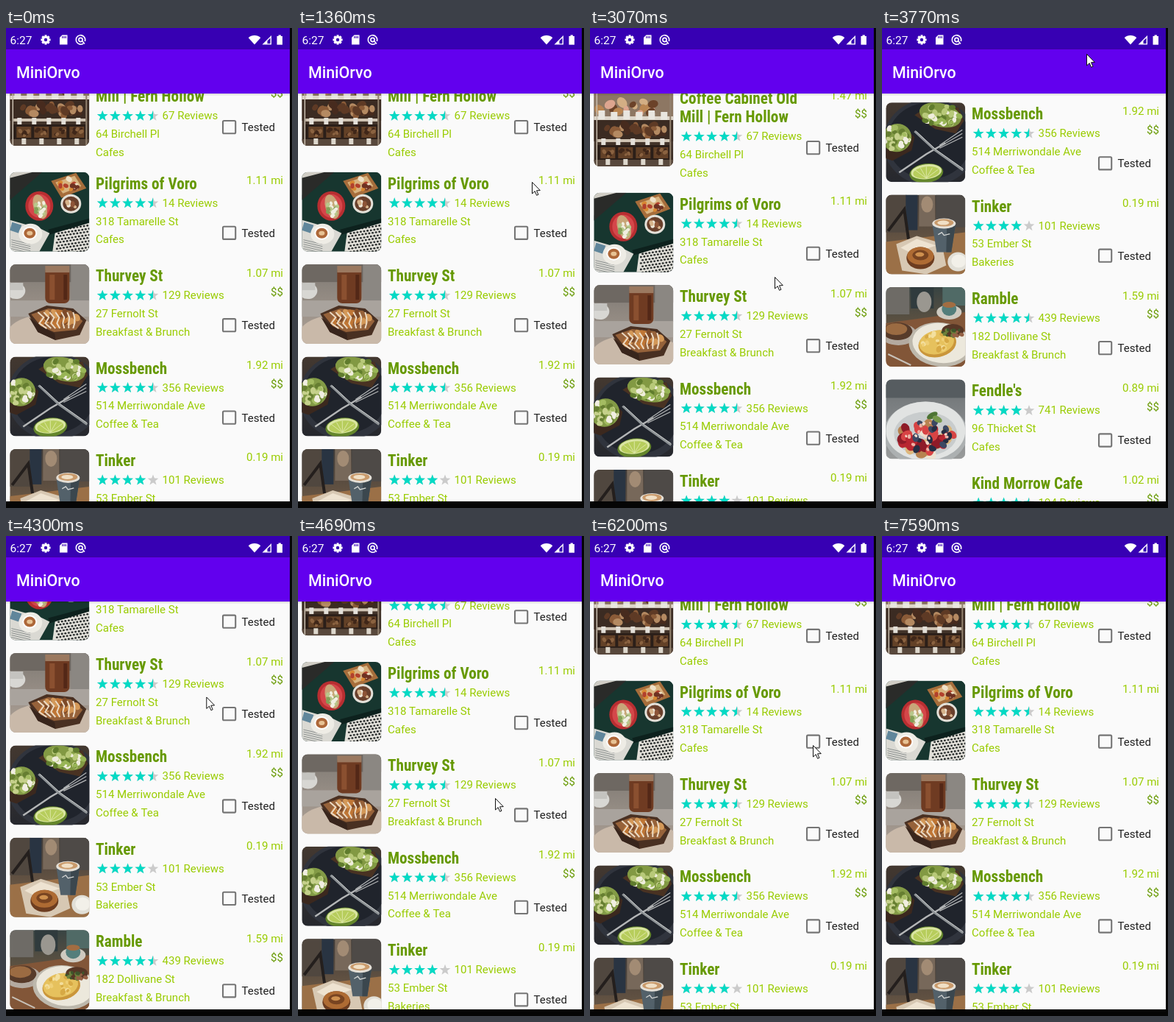
Recreate the animation shown at these times as an HTML page with a canvas. Size 389 by 652 pixels, loop 9330 ms.

```html
<!DOCTYPE html>
<html lang="en">
<head>
<meta charset="utf-8">
<title>MiniOrvo</title>
<style>
html, body { margin: 0; width: 100%; height: 100%; overflow: hidden; background: #050505; }
canvas { display: block; width: 389px; height: 652px; }
</style>
</head>
<body>
<canvas id="stage"></canvas>
<script>
const W = 389, H = 652, LOOP = 9330;
const canvas = document.getElementById('stage');
const c = canvas.getContext('2d');
const dpr = window.devicePixelRatio || 1;
canvas.width = Math.round(W * dpr);
canvas.height = Math.round(H * dpr);

const BODY = '400 15.05px Roboto, sans-serif';
const BAR = '500 21.4px Roboto, sans-serif';
const TITLE = '700 condensed 21.2px "Roboto Condensed", Roboto, sans-serif';
const DARK = '#669900', LIGHT = '#99cc00', TEAL = '#03dac5', BG = '#fafafa';

// Narrow the titles evenly when no condensed face is installed.
function width(font) {
  c.font = font;
  return c.measureText('Hamburgefonts').width;
}
const squeeze = width(TITLE) > width('700 21.2px Roboto, sans-serif') * 0.96 ? 0.88 : 1;

// ---- drawing helpers ----
function text(s, x, y, font, color, align = 'left') {
  c.font = font;
  c.fillStyle = color;
  c.textAlign = align;
  c.fillText(s, x, y);
}
function title(s, x, y) {
  c.save();
  c.translate(x, y);
  c.scale(squeeze, 1);
  text(s, 0, 0, TITLE, DARK);
  c.restore();
}
function rect(x, y, w, h, color) {
  c.fillStyle = color;
  c.fillRect(x, y, w, h);
}
function oval(x, y, rx, ry, color, rot = 0) {
  c.fillStyle = color;
  c.beginPath();
  c.ellipse(x, y, rx, ry, rot, 0, 7);
  c.fill();
}
function trace(pts) {
  c.beginPath();
  for (let i = 0; i < pts.length; i += 2) c.lineTo(pts[i], pts[i + 1]);
}
function poly(color, ...pts) {
  trace(pts);
  c.closePath();
  c.fillStyle = color;
  c.fill();
}
function line(color, w, ...pts) {
  trace(pts);
  c.strokeStyle = color;
  c.lineWidth = w;
  c.stroke();
}
function fade(top, bottom) {
  const g = c.createLinearGradient(0, 0, 0, 108);
  g.addColorStop(0, top);
  g.addColorStop(1, bottom);
  rect(0, 0, 108, 108, g);
}
function random(seed) {
  return () => (seed = (seed * 16807) % 2147483647) / 2147483647;
}
function scatter(seed, n, x, y, rx, ry, size, colors) {
  const r = random(seed);
  for (let i = 0; i < n; i++) {
    const a = r() * 6.28, d = Math.sqrt(r()), s = size * (0.6 + r() * 0.6);
    oval(x + Math.cos(a) * d * rx, y + Math.sin(a) * d * ry, s, s * 0.75,
      colors[i % colors.length], r() * 3);
  }
}

// ---- food pictures, each 108 by 108 ----
function pastryCase() {
  fade('#6a5546', '#33271f');
  rect(0, 8, 108, 34, '#8d7763');
  scatter(9, 16, 54, 29, 50, 9, 7, ['#b98552', '#d3ae84', '#dda58f', '#6b4229']);
  rect(0, 40, 108, 5, '#ddd5c9');
  for (let i = 0; i < 6; i++) rect(6 + i * 17, 32 + i % 2 * 2, 9, 12, '#e9e6df');
  rect(0, 45, 108, 29, '#3b2b22');
  scatter(41, 26, 54, 60, 49, 8, 6.5, ['#8a5b38', '#5e3a25', '#b48a62', '#472b1e']);
  rect(5, 71, 98, 4, '#cfc3b3');
  for (let i = 0; i < 5; i++) rect(10 + i * 20, 70, 6, 9, '#e3dfd8');
  rect(4, 79, 100, 22, '#2b1f19');
  for (let i = 0; i < 4; i++) {
    rect(9 + i * 24, 82, 20, 15, '#634127');
    scatter(i + 70, 8, 19 + i * 24, 89, 8, 5, 3, ['#8a6240', '#402719']);
  }
  rect(0, 99, 108, 9, '#58483c');
  for (let i = 0; i < 4; i++) rect(16 + i * 24, 98, 6, 8, '#ddd7cc');
  line('#cabfb1', 1.5, 4, 0, 4, 108);
  line('#93826f', 2, 104, 0, 104, 108);
}
function cafeTable() {
  rect(0, 0, 108, 108, '#17362f');
  poly('#d0cdc5', 0, 0, 38, 0, 0, 31);
  poly('#2a2b29', 0, 8, 31, 0, 44, 0, 0, 38);
  poly('#e1dfd8', 62, 78, 108, 66, 108, 108, 58, 108);
  for (let y = 0; y < 9; y++)
    for (let x = 0; x < 11; x++)
      oval(64 + x * 4.6 + y % 2 * 2.3, 79 + y * 4.2 - x * 0.7, 1.5, 1.3, '#272b2b');
  poly('#0d211d', 52, 78, 108, 63, 108, 69, 54, 85);
  poly('#a66d3b', 56, 12, 90, 1, 104, 22, 70, 35);
  poly('#d7b37f', 62, 14, 88, 5, 97, 19, 72, 29);
  scatter(17, 12, 80, 17, 13, 8, 4, ['#b2412c', '#efe1c7', '#d88833', '#6e3222']);
  oval(40, 46, 19, 20, '#b82e31');
  oval(40, 46, 15, 16, '#d4474a');
  oval(41, 47, 9, 17, '#c8a678', -0.3);
  scatter(5, 17, 41, 46, 8, 14, 3.5, ['#b8c78b', '#f1eee0', '#839f57']);
  oval(83, 43, 14, 13, '#e4e1d9');
  oval(83, 43, 11, 10, '#69402c');
  scatter(23, 10, 83, 43, 8, 7, 3.5, ['#d6b38b', '#efe7d7', '#8d5437']);
  poly('#dad9d3', 0, 65, 42, 77, 54, 83, 40, 108, 0, 108);
  for (let i = 0; i < 7; i++) line('#8b908f', 1, 2, 92 + i * 3, 28, 98 + i * 3);
  poly('#60869b', 3, 68, 16, 72, 12, 83, 0, 79);
  oval(28, 84, 16, 14, '#eeece5');
  oval(27, 83, 10, 9, '#fff');
  oval(27, 83, 8, 7, '#ad6738');
  oval(27, 83, 4, 3, '#e7c294');
}
function toastAndJar() {
  fade('#7e7973', '#b0a398');
  rect(0, 0, 108, 24, '#6e6862');
  rect(83, 0, 25, 50, '#8b8782');
  rect(0, 49, 108, 22, '#a9a39d');
  oval(8, 36, 13, 11, '#d8d7d3');
  rect(0, 25, 18, 10, '#c4c3bf');
  c.fillStyle = '#6f3b22';
  c.beginPath();
  c.roundRect(48, 3, 33, 50, 7);
  c.fill();
  rect(48, 2, 33, 9, '#9b7960');
  rect(54, 14, 7, 34, '#8a5030');
  rect(73, 14, 5, 34, '#532817');
  oval(58, 94, 61, 27, '#c9b9a9');
  poly('#493022', 25, 67, 50, 56, 86, 60, 104, 76, 95, 96, 62, 103, 38, 92);
  poly('#96623a', 29, 68, 52, 60, 83, 63, 99, 77, 90, 89, 60, 92, 42, 84);
  scatter(37, 28, 65, 73, 26, 11, 5, ['#bf7635', '#7c4928', '#d39858']);
  for (let i = 0; i < 7; i++)
    line('#ead9c3', 2, 38 + i * 8, 65, 46 + i * 7, 72, 40 + i * 8, 80, 50 + i * 6, 87);
  poly('#38251c', 26, 72, 38, 92, 62, 103, 61, 94, 43, 85);
}
function greenToast() {
  fade('#433830', '#26282e');
  oval(60, 54, 64, 59, '#30343d');
  oval(59, 52, 57, 52, '#20242c');
  poly('#493222', 39, 17, 62, 2, 99, 7, 106, 25, 95, 42, 67, 36);
  oval(74, 17, 29, 16, '#829943', 0.25);
  scatter(51, 40, 74, 17, 27, 14, 4.5, ['#98b556', '#607c2d', '#b8c979', '#efeddc']);
  poly('#3b281e', 0, 35, 26, 33, 39, 47, 35, 65, 9, 79, 0, 76);
  oval(15, 48, 20, 19, '#839b46', -0.4);
  scatter(77, 35, 14, 48, 18, 16, 4.5, ['#a4bc62', '#667e31', '#c5d08b', '#f1eee1']);
  line('#b4b6b7', 2.4, 18, 95, 55, 70, 81, 55);
  for (let i = 0; i < 3; i++) line('#b4b6b7', 1.2, 73, 58 + i * 2, 104, 37 + i * 5);
  line('#8e9396', 3, 39, 39, 67, 65, 105, 92);
  line('#d3d5d4', 1, 41, 39, 68, 64, 105, 90);
  oval(55, 96, 23, 13, '#64862b', -0.12);
  oval(55, 94, 21, 10, '#dae5a2', -0.12);
  oval(55, 95, 18, 8, '#b7cd5c', -0.12);
  for (let i = -2; i < 3; i++) line('#dce6a5', 1, 55, 103, 55 + i * 8, 87 + Math.abs(i) * 2);
}
function takeaway() {
  fade('#403b38', '#80664b');
  rect(0, 0, 28, 51, '#50473f');
  rect(27, 0, 16, 48, '#293442');
  rect(45, 0, 22, 43, '#77685a');
  rect(68, 0, 40, 44, '#4e4a47');
  oval(56, 13, 8, 11, '#a28b74');
  line('#241f1d', 4, 3, 49, 25, 20, 31, 62);
  poly('#9b7047', 0, 64, 108, 51, 108, 108, 0, 108);
  poly('#d7c8b3', 14, 67, 42, 56, 76, 66, 82, 96, 55, 108, 22, 103);
  poly('#eee3d1', 20, 72, 42, 60, 68, 69, 36, 80);
  oval(47, 86, 19, 15, '#6d3d20');
  oval(47, 83, 18, 12, '#ae6b33');
  oval(47, 82, 11, 7, '#784421');
  oval(46, 81, 6, 3, '#cf914f');
  poly('#53616a', 63, 39, 95, 39, 89, 78, 69, 78);
  poly('#3b474e', 83, 39, 95, 39, 89, 78, 82, 78);
  oval(79, 39, 16, 7, '#e5e0d7');
  oval(79, 38, 13, 5, '#c99a6b');
  oval(78, 38, 8, 3, '#f0dfc5');
  line('#d5d7d5', 1.3, 71, 54, 76, 51, 79, 55, 87, 53);
  oval(98, 91, 14, 13, '#e1dfd7');
  oval(99, 90, 10, 9, '#f2f0e9');
}
function omelette() {
  fade('#384443', '#8b613e');
  rect(0, 0, 32, 37, '#6e6b66');
  rect(34, 0, 31, 29, '#303b3d');
  rect(77, 0, 31, 25, '#506a66');
  oval(52, 20, 10, 14, '#9a9790');
  poly('#825638', 0, 49, 108, 34, 108, 108, 0, 108);
  oval(86, 34, 17, 10, '#cecac0');
  oval(86, 30, 10, 9, '#547e7b');
  oval(86, 24, 9, 4, '#a26d42');
  oval(17, 64, 25, 15, '#b4aaa0');
  oval(16, 60, 20, 12, '#573b2a');
  oval(14, 57, 15, 8, '#9b6b42');
  oval(74, 78, 43, 30, '#bdb8ac', 0.12);
  oval(75, 76, 39, 27, '#ece8dc', 0.12);
  oval(70, 77, 26, 18, '#ca963b', -0.2);
  oval(69, 75, 24, 16, '#e6c15d', -0.2);
  scatter(64, 18, 69, 75, 20, 12, 4, ['#efcf76', '#d7a945', '#f3df9e']);
  oval(91, 59, 15, 9, '#573726');
  scatter(31, 14, 90, 62, 14, 7, 3, ['#6c813b', '#3f552b', '#946044']);
  line('#c7c1b8', 2, 3, 91, 34, 106);
}
function berryBowl() {
  fade('#6b7073', '#999b9b');
  rect(0, 0, 108, 25, '#565c60');
  oval(54, 74, 57, 44, '#acb0b1');
  oval(54, 70, 54, 40, '#e1e3e2');
  oval(54, 74, 43, 30, '#c8cccd');
  scatter(18, 18, 55, 82, 36, 20, 9, ['#ddb87d', '#b78350', '#ece3d1']);
  scatter(27, 32, 56, 77, 35, 20, 8, ['#b82631', '#d74445', '#8e1b28']);
  scatter(58, 17, 58, 77, 35, 20, 5, ['#252e43', '#3c4863']);
  scatter(83, 14, 54, 78, 30, 20, 2.5, ['#efb2a5', '#f3d8c8']);
  oval(63, 49, 8, 4, '#4d7434', -0.5);
  oval(70, 54, 7, 4, '#76984c', 0.5);
}

// ---- list ----
const rows = [
  [['Coffee Cabinet Old', 'Mill | Fern Hollow'], 4.5, 67, '64 Birchell Pl', 'Cafes', '1.47', '$$', pastryCase],
  [['Pilgrims of Voro'], 4.5, 14, '318 Tamarelle St', 'Cafes', '1.11', '', cafeTable],
  [['Thurvey St'], 4.5, 129, '27 Fernolt St', 'Breakfast & Brunch', '1.07', '$$', toastAndJar],
  [['Mossbench'], 4.5, 356, '514 Merriwondale Ave', 'Coffee & Tea', '1.92', '$$', greenToast],
  [['Tinker'], 4, 101, '53 Ember St', 'Bakeries', '0.19', '', takeaway],
  [['Ramble'], 4.5, 439, '182 Dollivane St', 'Breakfast & Brunch', '1.59', '$$', omelette],
  [["Fendle's"], 4, 741, '96 Thicket St', 'Cafes', '0.89', '$$', berryBowl],
  [['Kind Morrow Cafe'], 4.5, 194, '72 Larkell St', 'Cafes', '1.02', '$$', null]
];
const PITCH = 125.4, TALL = 143.7;

function star(x, y, color) {
  const pts = [];
  for (let i = 0; i < 10; i++) {
    const a = i * Math.PI / 5 - Math.PI / 2, r = i % 2 ? 3.2 : 7.7;
    pts.push(x + Math.cos(a) * r, y + Math.sin(a) * r);
  }
  poly(color, ...pts);
}
function stars(rating, y) {
  for (let i = 0; i < 5; i++) star(131.2 + i * 17.2, y, '#cbcbcb');
  c.save();
  c.beginPath();
  c.rect(120, y - 10, 2.6 + rating * 17.2, 20);
  c.clip();
  for (let i = 0; i < 5; i++) star(131.2 + i * 17.2, y, TEAL);
  c.restore();
}
function checkbox(x, y, on) {
  c.beginPath();
  c.roundRect(x - 8.6, y - 8.6, 17.2, 17.2, 1.5);
  c.lineWidth = 2.1;
  c.strokeStyle = on ? TEAL : '#757575';
  c.stroke();
  if (!on) return;
  c.fillStyle = TEAL;
  c.fill();
  line('#fff', 2.1, x - 6, y, x - 2, y + 4.2, x + 6.2, y - 4.2);
}
function picture(draw, y) {
  c.save();
  c.translate(5.3, y);
  c.beginPath();
  c.roundRect(0, 0, 108, 108, 8);
  c.clip();
  draw();
  c.restore();
}
function row([names, rating, reviews, street, kind, miles, price, draw], y, on, ripple) {
  if (y > 643 || y + TALL < 88) return;
  if (draw) picture(draw, y);
  names.forEach((s, i) => title(s, 122, y + 23 + i * 25.3));
  const low = y + (names.length - 1) * 25.3;
  stars(rating, low + 42.3);
  text(reviews + ' Reviews', 212.5, low + 47, BODY, LIGHT);
  text(street, 122, low + 71.8, BODY, LIGHT);
  text(kind, 122, low + 96.6, BODY, LIGHT);
  text(miles + ' mi', 377, y + 16.5, BODY, LIGHT, 'right');
  text(price, 377, y + 41.4, BODY, DARK, 'right');
  if (ripple) oval(303.6, y + 82.6, 21.4, 21.4, `rgba(0,0,0,${ripple})`);
  checkbox(303.6, y + 82.6, on);
  text('Tested', 320.5, y + 88, BODY, '#212121');
}

// ---- bars ----
function gear(x, y) {
  for (let i = 0; i < 4; i++) {
    const a = i * Math.PI / 4, dx = Math.cos(a) * 6.6, dy = Math.sin(a) * 6.6;
    line('#fff', 3, x - dx, y - dy, x + dx, y + dy);
  }
  oval(x, y, 5.2, 5.2, '#fff');
  oval(x, y, 2.2, 2.2, '#3700b3');
}
function ring(x, y, r, from, to) {
  c.beginPath();
  c.arc(x, y, r, from, to);
  c.strokeStyle = '#fff';
  c.lineWidth = 1.6;
  c.stroke();
}
function bars() {
  rect(0, 0, 386, 28.5, '#3700b3');
  rect(0, 28.5, 386, 60.5, '#6200ee');
  text('6:27', 5.5, 21.5, '400 15.5px Roboto, sans-serif', '#fff');
  gear(54, 16);
  poly('#fff', 76.5, 9.5, 83.5, 9.5, 83.5, 22.5, 73, 22.5, 73, 13);
  for (let i = 0; i < 3; i++) rect(76.3 + i * 2.2, 11, 1.1, 3, '#3700b3');
  ring(101.5, 16, 6.2, 0.9, 6.6);
  ring(101.5, 16, 2.6, 0, 6.3);
  line('#fff', 1.5, 104, 18, 107, 21.5);
  c.fillStyle = '#fff';
  c.beginPath();
  c.moveTo(338, 22.5);
  c.arc(338, 22.5, 12.5, -2.3, -0.84);
  c.fill();
  poly('#fff', 361, 10, 361, 22.5, 348.5, 22.5);
  poly('#3700b3', 359.6, 13.4, 359.6, 21.2, 355.5, 21.2, 355.5, 17.4);
  rect(368.5, 11, 7.5, 11.7, '#fff');
  rect(370.6, 9.5, 3.3, 2, '#fff');
  text('MiniOrvo', 14, 67.5, BAR, '#fff');
}
function pointer(x, y) {
  c.save();
  c.translate(x + 0.5, y + 0.5);
  trace([0, 0, 0, 15.5, 3.7, 12.2, 6.1, 17.8, 8.4, 16.8, 6, 11.3, 10.8, 11.1]);
  c.closePath();
  c.fillStyle = '#fff';
  c.fill();
  c.strokeStyle = '#111';
  c.lineWidth = 1;
  c.stroke();
  c.restore();
}

// ---- motion ----
// start, end, number of picture changes
const spans = [
  [800, 1360, 5], [1630, 2530, 7], [2680, 3070, 4], [3220, 3610, 4], [3770, 4690, 8],
  [5000, 5960, 8], [6080, 6200, 2], [6350, 7020, 6], [7170, 7290, 2], [7590, 7590, 1]
];
function stepTime(t) {
  let q = 0;
  for (const [a, b, n] of spans) {
    if (t < a) break;
    const d = (b - a) / (n - 1) || 1;
    q = a + Math.min(n - 1, Math.floor((t - a) / d + 1e-6)) * d;
  }
  return q;
}
// time, pointer x, pointer y, list offset
const keys = [
  [800, 73, 549, 195.7], [1360, 318, 209, 195.7], [1780, 275, 310, 195.7],
  [2530, 262, 200, 85.7], [3070, 251, 338, 223.7], [3610, 274, 92, -80],
  [3770, 278, 35, -149.6], [4690, 268, 356, 171], [5410, 272, 381, 196.6],
  [5960, 303, 284, 196.6], [7020, 303, 284, 196.6], [7170, 308, 470, 196.6],
  [7290, 312, 641, 196.6]
];
function pose(t) {
  const i = keys.findIndex(k => k[0] > t);
  if (i === 0) return keys[0];
  if (i < 0) return keys[keys.length - 1];
  const a = keys[i - 1], b = keys[i], f = (t - a[0]) / (b[0] - a[0]);
  return a.map((v, j) => v + (b[j] - v) * f);
}
function rippleAt(t) {
  if (t < 6350 || t >= 7290) return 0;
  return 0.11 * Math.min(1, (t - 6250) / 200, (7290 - t) / 300);
}

function draw(t) {
  const [, x, y, offset] = pose(t);
  c.setTransform(dpr, 0, 0, dpr, 0, 0);
  rect(0, 0, W, H, '#050505');
  rect(0, 89, 386, 554, BG);
  c.save();
  c.beginPath();
  c.rect(0, 89, 386, 554);
  c.clip();
  rows.forEach((r, i) => {
    const top = i ? offset + (i - 1) * PITCH : offset - TALL;
    const target = i === 1;
    row(r, top, target && t > 6480 && t < 6880, target ? rippleAt(t) : 0);
  });
  for (let i = 0; i < 3; i++) rect(0, 89 + i, 386, 1, `rgba(0,0,0,${0.12 - i * 0.04})`);
  c.restore();
  bars();
  if (t >= 800 && t < 7590) pointer(x, y);
}

let last = -1;
function frame() {
  const t = stepTime(performance.now() % LOOP);
  if (t !== last) draw(last = t);
  requestAnimationFrame(frame);
}
frame();
</script>
</body>
</html>
```
